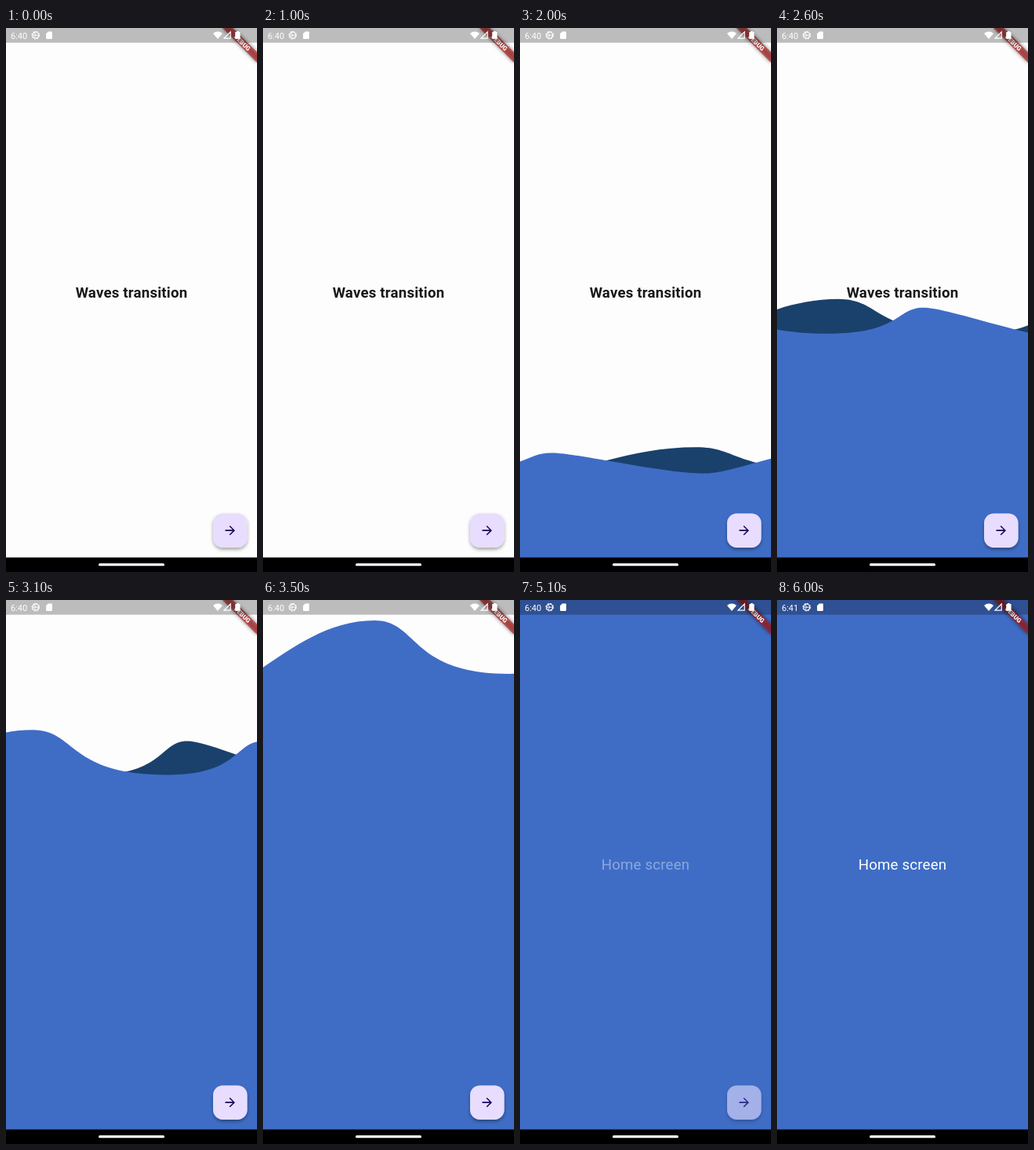
Animation of 320 by 692 pixels, one loop 7100 ms. Source, as an HTML page:

```html
<!DOCTYPE html>
<html lang="en">
<head>
<meta charset="utf-8">
<title>Waves transition</title>
<style>
  html, body { margin: 0; height: 100%; overflow: hidden; background: #000; }
  svg { display: block; width: 100vw; height: 100vh; }
  text { font-family: Roboto, sans-serif; }
  .label { font-size: 18.67px; letter-spacing: .19px; text-anchor: middle; }
</style>
</head>
<body>
<svg viewBox="0 0 320 692">
  <defs>
    <filter id="soft" x="-50%" y="-150%" width="200%" height="400%">
      <feGaussianBlur stdDeviation="2.8"/>
    </filter>
    <filter id="lift" x="-30%" y="-30%" width="160%" height="170%">
      <feDropShadow dx="0" dy="2.4" stdDeviation="2.2" flood-opacity=".36"/>
    </filter>
  </defs>

  <rect width="320" height="692" fill="#fefdfe"/>
  <text class="label" x="160" y="343" font-weight="700" fill="#171618">Waves transition</text>
  <path id="back" fill="#1a416c"/>
  <path id="front" fill="#3f6dc6"/>

  <text id="home" class="label" x="160" y="343" fill="#fff">Home screen</text>
  <g id="button">
    <rect x="264" y="617.4" width="43.6" height="43.6" rx="12.4" fill="#e8ddff" filter="url(#lift)"/>
    <path transform="translate(276.4 629.8) scale(.778)" fill="#21005d"
      d="M12 4l-1.41 1.41L16.17 11H4v2h12.17l-5.58 5.59L12 20l8-8z"/>
  </g>

  <!-- debug ribbon -->
  <g transform="translate(320) rotate(45)">
    <rect x="-31.1" y="21.8" width="62.2" height="9.33" opacity=".5" filter="url(#soft)"/>
    <rect x="-31.1" y="21.8" width="62.2" height="9.33" fill="#b71c1c" fill-opacity=".627"/>
    <text y="29.3" font-size="7.93" font-weight="900" text-anchor="middle" fill="#fff">DEBUG</text>
  </g>

  <!-- status bar -->
  <rect width="320" height="18.7" opacity=".26"/>
  <g fill="#fff">
    <text id="clock" x="6" y="13.6" font-size="11"></text>
    <g fill="none" stroke="#fff">
      <circle cx="37.8" cy="9.2" r="4" stroke-width="1.2"/>
      <circle cx="37.8" cy="9.2" r="4.9" stroke-width="1" stroke-dasharray="1.9 1.95"/>
      <path d="M34 9.2h7.6M37.8 9.2l-2 -3.3M37.8 9.2l-2 3.3" stroke-width=".9"/>
    </g>
    <path d="M53.9 4.5h4.2q.8 0 .8 .8v7.8q0 .8 -.8 .8h-6.2q-.8 0 -.8 -.8v-5.8z"/>
    <path d="M264 6.9q6 -4.6 12 0l-6 7z"/>
    <path d="M278 13.2h8.2v-8.2z" fill="none" stroke="#fff" stroke-width="1.2"/>
    <path d="M294 4h2.8v1h1.1q.7 0 .7 .7v7.4q0 .7 -.7 .7h-5q-.7 0 -.7 -.7v-7.4q0 -.7 .7 -.7h1.1z"/>
  </g>

  <!-- navigation bar -->
  <rect y="673.5" width="320" height="19"/>
  <rect x="118" y="681.1" width="84" height="3.1" rx="1.55" fill="#fff"/>
</svg>
<script>
const $ = id => document.getElementById(id);
const LOOP = 7100, STEP = 100;
const RISE_START = 936, RISE_TIME = 4028;
const FADE_START = 4900, FADE_TIME = 500;
const PERIOD = 677;

// Crests and troughs of one period, joined with level tangents:
// x, depth, handle to the left, handle to the right
const TURNS = [
  [0, 0, 89, 56], [172, 1, 128, 92], [293, .25, 35, 32], [487, 1.18, 52, 42]
];

const clamp01 = v => Math.min(Math.max(v, 0), 1);

function turn(i) {
  const n = TURNS.length, [x, y, left, right] = TURNS[i % n];
  return { x: x + (Math.floor(i / n) - 2) * PERIOD, y, left, right };
}

function wavePath() {
  const first = turn(0);
  let d = `M${first.x} ${first.y}`;
  for (let i = 0; i < 4 * TURNS.length; i++) {
    const a = turn(i), b = turn(i + 1);
    d += `C${a.x + a.right} ${a.y} ${b.x - b.left} ${b.y} ${b.x} ${b.y}`;
  }
  return d + `V900H${first.x}z`;
}

function place(id, x, top, height) {
  $(id).setAttribute('transform', `translate(${x} ${top}) scale(1 ${height})`);
}

function draw(now) {
  const t = Math.floor(now % LOOP / STEP) * STEP;

  // The water eases up while the swell grows and the two waves cross.
  const u = clamp01((t - RISE_START) / RISE_TIME);
  const top = 219.5 + 465 * Math.cos(Math.PI * u);
  const swell = 106.5 * u;
  const drift = (369 - top - swell / 2) * .81;
  place('front', drift - 108, top, swell);
  place('back', 80 - drift, top, swell);

  const fade = clamp01((t - FADE_START) / FADE_TIME);
  $('home').setAttribute('opacity', fade);
  $('button').setAttribute('opacity', 1 - fade);
  $('clock').textContent = t < 6000 ? '6:40' : '6:41';
}

for (const id of ['back', 'front']) $(id).setAttribute('d', wavePath());

let start;
function tick(now) {
  start ??= now;
  draw(now - start);
  requestAnimationFrame(tick);
}
draw(0);
requestAnimationFrame(tick);
</script>
</body>
</html>
```
